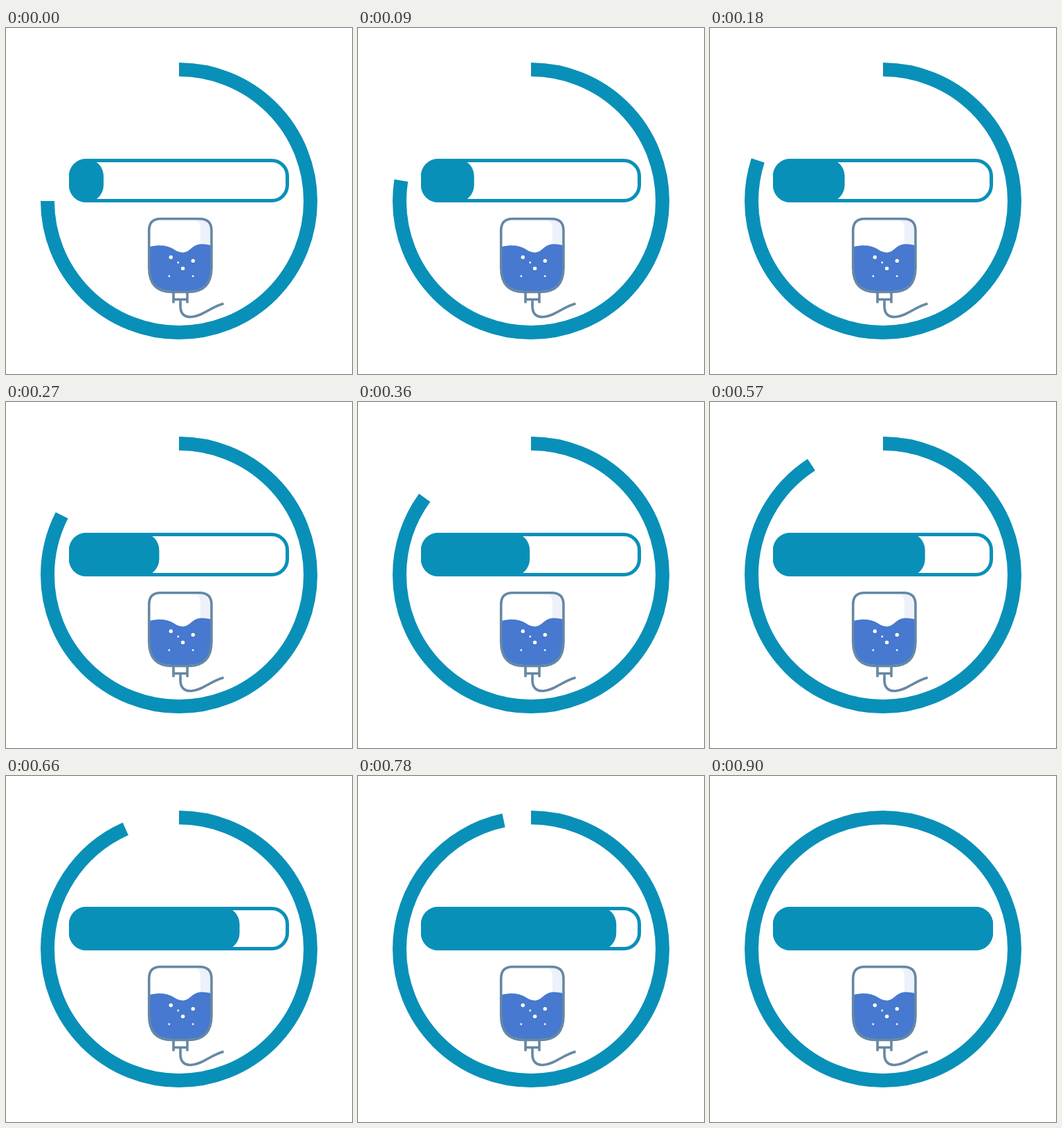
An HTML page without scripts that plays this animation: 500 by 500 pixels, repeating every 1.9 s.

```html
<!DOCTYPE html>
<html lang="en">
<head>
<meta charset="utf-8">
<title>Infusion progress</title>
<style>
  html, body { margin: 0; width: 100%; height: 100%; overflow: hidden; background: #fff; }
  svg { display: block; width: 100%; height: 100%; }

  .ring, .frame { fill: none; stroke: #0990b8; }
  .ring { stroke-width: 20; stroke-dasharray: 270 400; animation: sweep 1900ms infinite; }
  .frame { stroke-width: 5; }
  .fill { fill: #0990b8; width: 50px; animation: grow 1900ms infinite; }

  .line { fill: none; stroke: #6688a4; stroke-width: 3.6; }
  .liquid { fill: #4679cf; }
  .shade { fill: #eef1f9; }

  /* 30 steps of 30 ms, then hold for one second */
  @keyframes sweep {
    0% { stroke-dasharray: 270 400; animation-timing-function: steps(30); }
    47.368%, 100% { stroke-dasharray: 360 400; }
  }
  @keyframes grow {
    0% { width: 50px; animation-timing-function: steps(30); }
    47.368%, 100% { width: 318px; }
  }
</style>
</head>
<body>
<svg viewBox="0 0 500 500">
  <path class="ring" pathLength="360" d="M250 60A190 190 0 0 1 250 440A190 190 0 0 1 250 60"/>

  <rect class="frame" x="93.5" y="191.5" width="313" height="58" rx="22.5"/>
  <rect class="fill" x="91" y="189" width="50" height="63" rx="25"/>

  <g class="bag">
    <path class="shade" d="M274 277H282Q296 278 296 292V316H281V291Q281 281 274 277Z"/>
    <path class="liquid" d="M208 316C222 313 234 314 243 320C252 326 260 326 267 319C275 311 285 311 296 314V347Q296 380 264 380H240Q208 380 208 347Z"/>
    <g fill="#fff">
      <circle cx="238.3" cy="331.3" r="2.7"/>
      <circle cx="248.8" cy="339" r="1.4"/>
      <circle cx="270.3" cy="336.4" r="2.7"/>
      <circle cx="255.6" cy="347.4" r="2.7"/>
      <circle cx="235.8" cy="358.6" r="1.4"/>
      <circle cx="270.2" cy="358.6" r="1.4"/>
    </g>
    <path class="line" d="M223 275.8H280Q297 275.8 297 293V346Q297 381.5 263 381.5H240Q206.700 381.5 206.700 346V293Q206.700 275.8 223 275.8Z"/>
    <path class="line" d="M242 381V397.500M262 381V397.500M242 392.300H262"/>
    <path class="line" d="M252 392V402C252 413 258 418 268 417.500C284 416.500 296 403 314.500 398.300"/>
  </g>
</svg>
</body>
</html>
```
